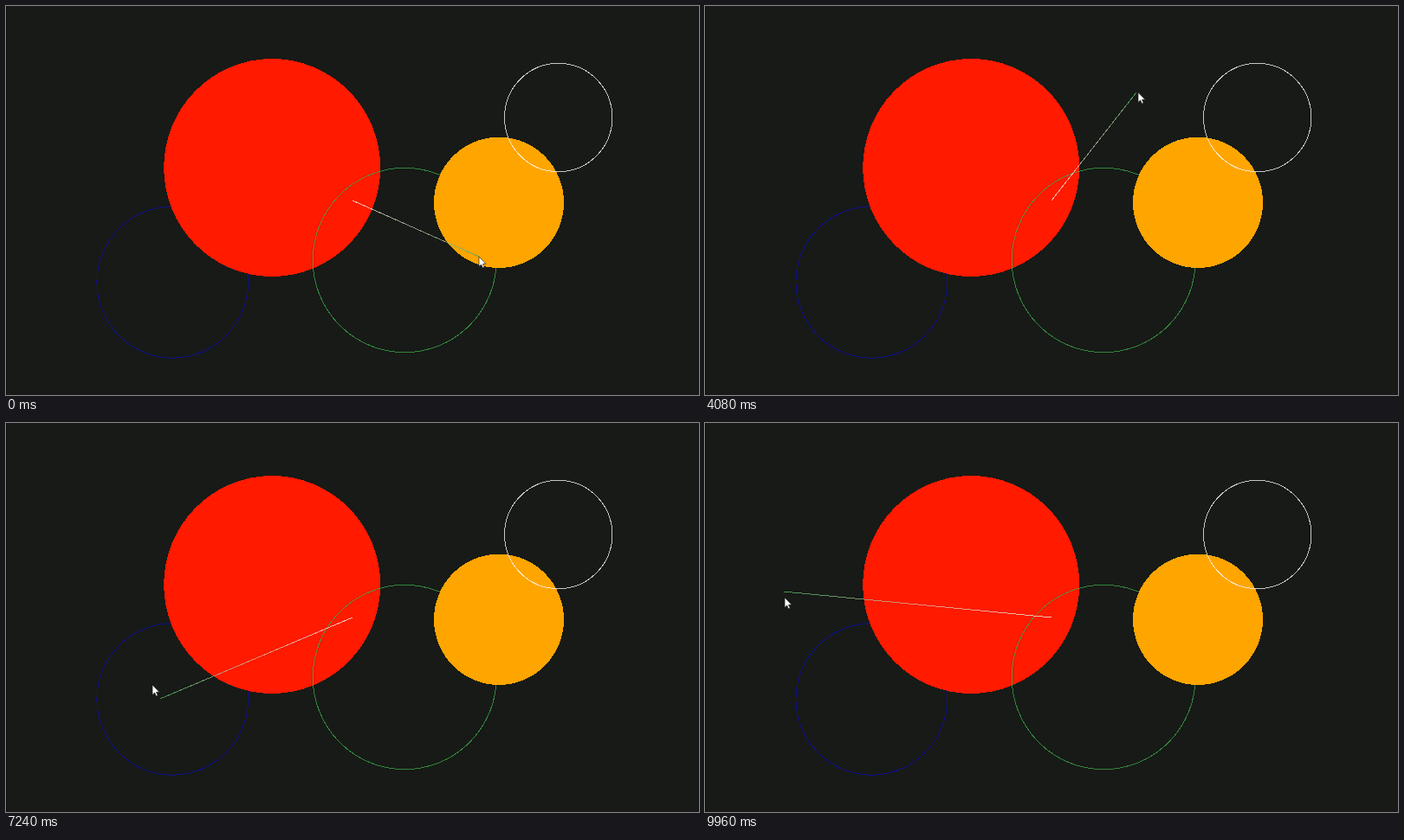
An HTML page that plays this animation: 800x450 px, repeating every 10 s.

```html
<!DOCTYPE html>
<html lang="en">
<head>
<meta charset="utf-8">
<title>Line and circles</title>
<style>
  html, body { margin: 0; width: 100%; height: 100%; overflow: hidden; background: #171a17; }
  svg { display: block; width: 800px; height: 450px; }
  .ring { fill: none; stroke-width: 1; }
</style>
</head>
<body>
<svg viewBox="0 0 800 450" shape-rendering="crispEdges">
  <defs>
    <linearGradient id="fade" gradientUnits="userSpaceOnUse" x1="400" y1="225">
      <stop offset="0" stop-color="#f2e4d0" stop-opacity=".85"/>
      <stop offset=".5" stop-color="#d0d0b0" stop-opacity=".65"/>
      <stop offset="1" stop-color="#50a45c" stop-opacity=".85"/>
    </linearGradient>
  </defs>
  <rect width="800" height="450" fill="#171a17"/>
  <rect width="1" height="450" fill="#0c0d0b"/>
  <ellipse class="ring" cx="192.2" cy="319.5" rx="87.3" ry="87.7" stroke="#10108a"/>
  <ellipse cx="307.2" cy="187" rx="125" ry="126" fill="#ff1a00"/>
  <ellipse class="ring" cx="460.2" cy="294" rx="106" ry="106.7" stroke="#3ca848" stroke-opacity=".75"/>
  <ellipse cx="569" cy="227.3" rx="75" ry="75.7" fill="#ffa500"/>
  <ellipse class="ring" cx="637.7" cy="129" rx="62.2" ry="62.7" stroke="#fff" stroke-opacity=".75"/>
  <line id="ray" x1="400" y1="225" stroke="url(#fade)"/>
  <path id="cursor" d="M0 0V11.4L2.6 9L4.4 13L6.2 12.2L4.5 8.3H8Z" fill="#fff"
        stroke="#20221f" stroke-width=".7" shape-rendering="auto"/>
</svg>
<script>
  const LOOP = 10000, STEP = 40;

  // Turning points of the pointer: time in ms, x, y
  const keys = [
    [0, 546, 290], [1400, 342, 342],
    [2400, 240, 364], [2520, 240, 364],
    [3900, 490, 103], [4080, 500, 100],
    [5480, 466, 298], [5680, 442, 343],
    [6680, 265, 352], [7130, 194, 347], [7240, 169, 303],
    [7600, 146, 180], [8540, 155, 64], [8720, 149, 89],
    [9760, 86, 166], [9960, 92, 202]
  ];

  const slope = (i, a) => (keys[i + 1][a] - keys[i][a]) / (keys[i + 1][0] - keys[i][0]);

  function tangent(i, a) {
    if (i === 0) return slope(0, a);
    if (i === keys.length - 1) return slope(i - 1, a);
    const before = keys[i][0] - keys[i - 1][0], after = keys[i + 1][0] - keys[i][0];
    const s0 = slope(i - 1, a), s1 = slope(i, a);
    return s0 && s1 ? (s0 * after + s1 * before) / (before + after) : 0;
  }

  // Smooth curve through the turning points
  function pointer(t) {
    let i = 0;
    while (i < keys.length - 2 && t >= keys[i + 1][0]) i++;
    const h = keys[i + 1][0] - keys[i][0], u = (t - keys[i][0]) / h, v = 1 - u;
    return [1, 2].map(a => Math.round(
      v * v * ((1 + 2 * u) * keys[i][a] + u * h * tangent(i, a)) +
      u * u * ((1 + 2 * v) * keys[i + 1][a] - v * h * tangent(i + 1, a))));
  }

  const ray = document.getElementById("ray");
  const fade = document.getElementById("fade");
  const cursor = document.getElementById("cursor");

  function draw(now) {
    const t = Math.floor((now % LOOP) / STEP) * STEP;
    const [x, y] = pointer(t);
    // The ray trails the pointer by one step
    const [ex, ey] = pointer(Math.max(0, t - STEP));
    for (const el of [ray, fade]) {
      el.setAttribute("x2", ex);
      el.setAttribute("y2", ey);
    }
    cursor.setAttribute("transform", `translate(${x} ${y})`);
  }

  const start = performance.now();
  function tick() {
    draw(performance.now() - start);
    requestAnimationFrame(tick);
  }
  tick();
</script>
</body>
</html>
```
